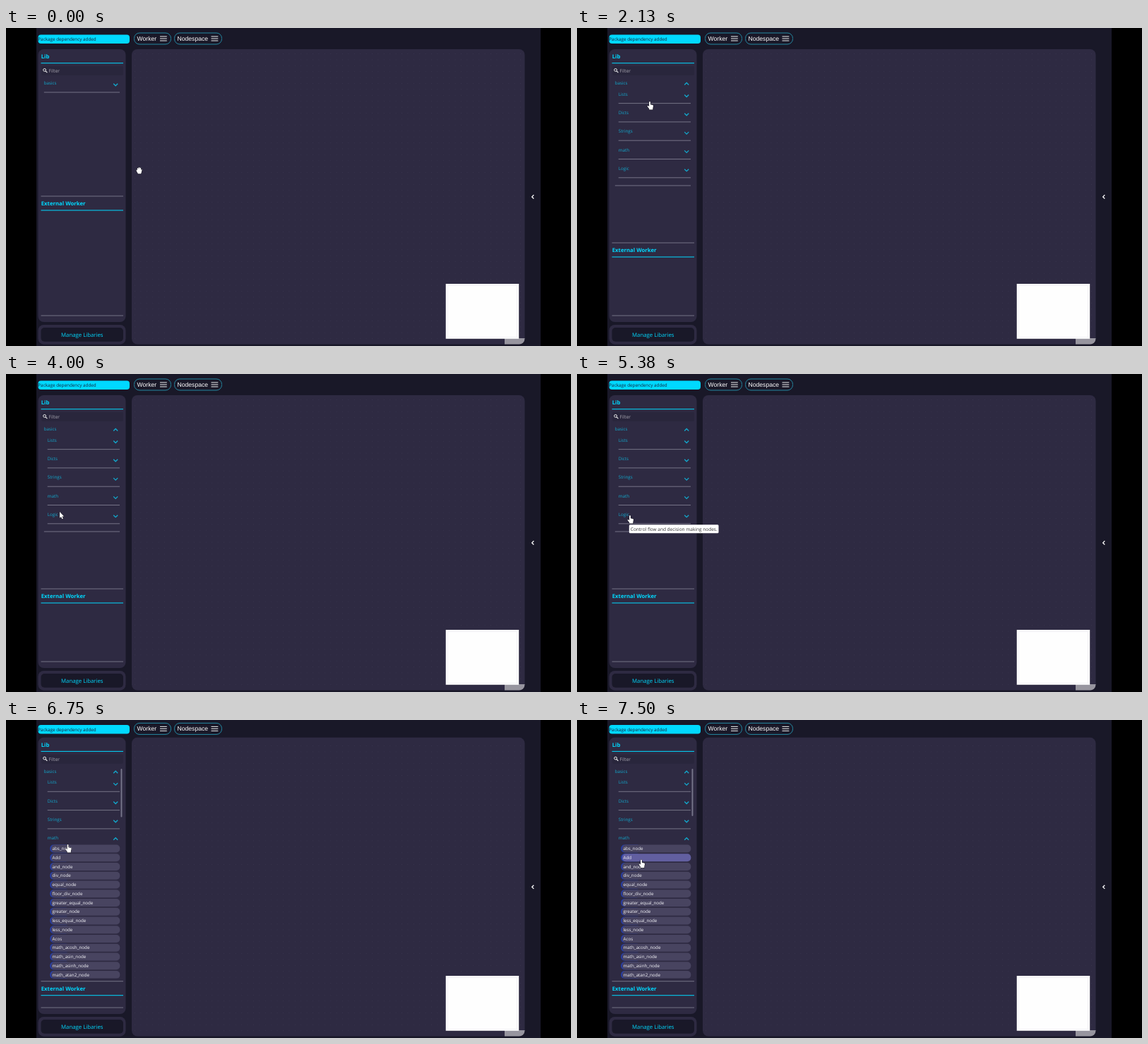
These frames come from a looping animation (800 by 450 pixels, 8000 ms). An HTML page with a canvas:

```html
<!DOCTYPE html>
<html lang="en">
<head>
<meta charset="utf-8">
<title>Node library</title>
<style>
html, body { margin: 0; width: 100%; height: 100%; overflow: hidden; background: #000; }
canvas { display: block; width: 100vw; height: 100vh; }
</style>
</head>
<body>
<canvas id="stage" width="800" height="450"></canvas>
<script>
const ctx = document.getElementById('stage').getContext('2d');
const LOOP = 8000, STEP = 125;
const UI = '"Open Sans", "Noto Sans", sans-serif';
const ARIAL = '"Liberation Sans", Arial, sans-serif';
const APP = '#191828', PANEL = '#2e2a42', CYAN = '#00d9ff', LABEL = '#12a9cd', RULE = '#757386';
const GROUPS = ['Lists', 'Dicts', 'Strings', 'math', 'Logic'];
const NODES = ['abs_node', 'Add', 'and_node', 'div_node', 'equal_node', 'floor_div_node',
  'greater_equal_node', 'greater_node', 'less_equal_node', 'less_node', 'Acos',
  'math_acosh_node', 'math_asin_node', 'math_asinh_node', 'math_atan2_node'];
const ROW = 26.3, NODE_ROW = 12.75;

// Pointer path: time, x, y of the hot spot
const PATH = [[0, 188.5, 201.5], [125, 180, 188], [625, 130, 101], [750, 130, 101], [1125, 123, 82],
  [1500, 123, 82], [2125, 103, 104], [2375, 98, 143.5], [3000, 72, 190], [3250, 72, 190],
  [3375, 72.5, 192.5], [3875, 72.5, 192.5], [4000, 76, 195], [4750, 76, 195], [5000, 75, 200],
  [6000, 75, 200], [6125, 82, 178], [6625, 82, 178], [6750, 87.5, 176], [7500, 91, 197.5], [LOOP, 91, 197.5]];

const ramp = (t, from, to) => Math.min(1, Math.max(0, (t - from) / (to - from)));
const ease = k => k * k * (3 - 2 * k);

function pointerAt(t) {
  const i = Math.max(1, PATH.findIndex(p => p[0] >= t));
  const [t0, x0, y0] = PATH[i - 1], [t1, x1, y1] = PATH[i];
  const k = ramp(t, t0, t1);
  return [x0 + (x1 - x0) * k, y0 + (y1 - y0) * k];
}

function box(x, y, right, bottom, radius, fill, stroke) {
  ctx.beginPath();
  ctx.roundRect(x, y, right - x, bottom - y, radius);
  if (fill) { ctx.fillStyle = fill; ctx.fill(); }
  if (stroke) { ctx.strokeStyle = stroke; ctx.lineWidth = 1; ctx.stroke(); }
}

function text(str, x, y, size, color, font = UI, weight = 400) {
  ctx.font = `${weight} ${size}px ${font}`;
  ctx.textRendering = 'geometricPrecision';
  ctx.fillStyle = color;
  ctx.fillText(str, x, y);
}

function rule(x, right, y, color = RULE) {
  ctx.fillStyle = color;
  ctx.fillRect(x, y - 0.5, right - x, 1);
}

function polyline(points, color, width) {
  ctx.beginPath();
  points.forEach(p => ctx.lineTo(...p));
  ctx.strokeStyle = color;
  ctx.lineWidth = width;
  ctx.stroke();
}

function chevron(y, up) {
  const d = up ? -1.5 : 1.5;
  polyline([[152.2, y - d], [155.2, y + d], [158.2, y - d]], LABEL, 1.3);
}

function clipped(x, y, right, bottom, draw) {
  ctx.save();
  ctx.beginPath();
  ctx.rect(x, y, right - x, bottom - y);
  ctx.clip();
  draw();
  ctx.restore();
}

function menuButton(label, x, right, iconX, dy) {
  box(x + 0.5, 7 + dy, right - 0.5, 23 + dy, 7.5, APP, '#2487a0');
  text(label, x + 4.5, 18 + dy, 8.65, '#fff', ARIAL);
  for (const y of [12, 15, 18]) rule(iconX, iconX + 9.8, y + dy, '#eee');
}

function drawHeader(dy) {
  box(45.5, 9.5 + dy, 175, 22 + dy, 4, CYAN);
  text('Package dependency added', 45.3, 18.4 + dy, 6.33, '#12253a');
  menuButton('Worker', 181, 234, 218, dy);
  menuButton('Nodespace', 238, 306, 290.5, dy);
  polyline([[747.3, 236.3 + dy], [744.7, 238.9 + dy], [747.3, 241.5 + dy]], '#fff', 1.3);
}

function drawWorkspace(top) {
  ctx.save();
  box(178, top, 734.5, 447.5, 8, PANEL);
  ctx.clip();
  ctx.fillStyle = 'rgba(150,150,185,.1)';
  for (let x = 182; x < 734; x += 8.4)
    for (let y = 36; y < 447; y += 8.4) ctx.fillRect(x, y, 1, 1);
  ctx.fillStyle = '#97959f';
  ctx.fillRect(706, 439, 29, 9);
  ctx.restore();
  box(622.7, 362, 726.2, 439.8, 0, '#fefefe');
  box(625.5, 364.5, 723.5, 437.5, 0, null, '#f3f2f6');
}

function drawNodes(hovered) {
  clipped(60, 170, 162, 365.5, () => NODES.forEach((name, i) => {
    const y = 182 + i * NODE_ROW;
    box(62.3, y - 5.5, 90, y + 5.5, 5, '#263fae');
    box(64, y - 5.5, 161.3, y + 5.5, 5, i === hovered ? '#625fa0' : '#484460');
    text(name, 65.5, y + 2.2, 6.25, '#f4f4f8');
  }));
}

function drawLibrary(t, mathOpen, hovered) {
  const dy = mathOpen ? -5.3 : 0;
  const opened = t >= 1625;
  const hover = 3 * ramp(t, 750, 1125);
  const height = hover + (132 - hover) * ease(ramp(t, 1500, 2125));

  box(45.5, 30 + dy, 169.5, 416, 8, PANEL);
  text('Lib', 49.7, 43 + dy, 7.75, CYAN, UI, 700);
  rule(49.5, 166, 49.7 + dy, CYAN);
  box(50, 54 + dy, 166, 67 + dy, 2, '#29263c');
  ctx.beginPath();
  ctx.arc(54.6, 59.4 + dy, 1.9, 0, 7);
  ctx.strokeStyle = '#eee';
  ctx.lineWidth = 1;
  ctx.stroke();
  polyline([[56, 60.8 + dy], [58.4, 63.2 + dy]], '#eee', 1.2);
  text('Filter', 60.6, 63.2 + dy, 6.6, '#a5a3ae');

  text('basics', 53.8, 80.2 + dy, 6.2, LABEL);
  chevron((opened ? 79 : 80.3) + dy, opened);
  if (opened) {
    clipped(45, 70, 166, mathOpen ? 366 : 90 + height, () => {
      GROUPS.slice(0, mathOpen ? 4 : 5).forEach((name, i) => {
        const y = i * ROW + dy, open = mathOpen && i === 3;
        text(name, 58.7, 95.7 + y, 6.25, LABEL);
        chevron((open ? 94.6 : 96) + y, open);
        if (!open) rule(58.7, 161, 106.6 + y);
      });
    });
  }
  if (mathOpen) {
    drawNodes(hovered);
    box(162.5, 69, 164.4, 137.5 - 1.5 * ramp(t, 6750, 7500), 1, '#77758a');
  } else {
    rule(53.8, 161, 91 + height);
  }

  const y = mathOpen ? 369.7 : 238 + height / 2;
  rule(49.5, 166, y);
  text('External Worker', 49.7, y + 13.4, 7.75, CYAN, UI, 700);
  rule(49.5, 166, y + 20, CYAN);
  rule(49.5, 166, 407);

  box(45.5, 420, 169.5, 447.7, 8, PANEL);
  box(49.5, 424, 166, 443.8, 5, APP);
  text('Manage Libaries', 78, 437, 7.8, CYAN);
}

function drawTooltip(alpha) {
  ctx.globalAlpha = alpha;
  box(73.8, 213.3, 200.5, 225.2, 1.5, '#fff');
  text('Control flow and decision making nodes.', 75.8, 221.8, 6.5, '#333');
  ctx.globalAlpha = 1;
}

const SHAPES = {
  arrow: new Path2D('M0 0V8.8L2 7L3.4 10.2L4.9 9.5L3.5 6.5H6.2Z'),
  hand: new Path2D('M-.9 .8Q0-.6 .9 .8V4.2L4.2 5Q5.2 5.3 5 6.5L4.3 10V11.6H-.8V10.2L-3.3 7Q-3.6 5.6-2.2 6L-.9 7.2Z'),
  grab: new Path2D('M-4-.5Q-3.4-1.5-2.5-.3L-2.7-3Q-2-4.2-1.2-3L-.8-1V-4Q.1-5 .8-4V-1L1.2-3.5Q2-4.4 2.6-3.3V-.5Q3.5-2.3 4.1-1.2L3.4 2.5L2.6 4.7H-1.5L-3.5 1.6Z')
};

function drawPointer(kind, x, y) {
  ctx.save();
  ctx.translate(x, y);
  ctx.strokeStyle = '#14131d';
  ctx.lineWidth = 1;
  ctx.stroke(SHAPES[kind]);
  ctx.fillStyle = '#fff';
  ctx.fill(SHAPES[kind]);
  ctx.restore();
}

function pointerKind(t) {
  if (t < 125) return 'grab';
  const arrow = t < 875 || (t >= 4000 && t < 4875);
  return arrow ? 'arrow' : 'hand';
}

function render(now) {
  const t = Math.floor((now % LOOP) / STEP + 0.01) * STEP % LOOP;
  const mathOpen = t >= 6750;
  const [x, y] = pointerAt(t);
  const hovered = t > 6750 ? Math.floor((y - 175.6) / NODE_ROW) : -1;

  ctx.fillStyle = '#000';
  ctx.fillRect(0, 0, 800, 450);
  ctx.fillStyle = APP;
  ctx.fillRect(43, 0, 714, 450);
  drawHeader(mathOpen ? -2.6 : 0);
  drawWorkspace(mathOpen ? 24.8 : 30);
  drawLibrary(t, mathOpen, hovered);
  if (t >= 5250 && t < 6125) drawTooltip(ramp(t, 5125, 5375));
  drawPointer(pointerKind(t), x, y);
}

const start = performance.now();
function tick() {
  render(performance.now() - start);
  requestAnimationFrame(tick);
}
tick();
</script>
</body>
</html>
```
